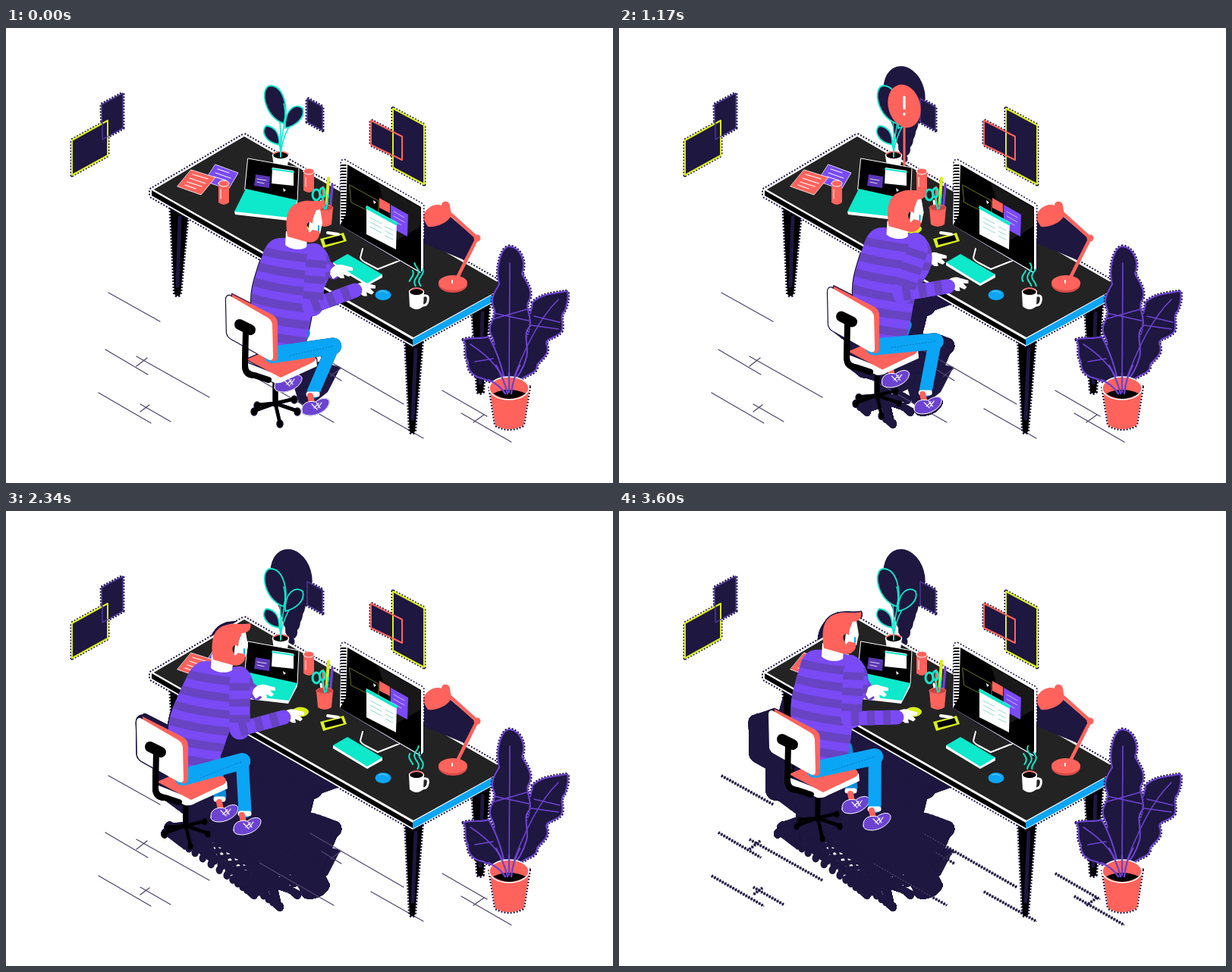
These frames come from a looping animation (800 by 600 pixels, 3630 ms). An HTML page with a canvas:

```html
<!DOCTYPE html>
<html lang="en">
<head>
<meta charset="utf-8">
<title>Desk work</title>
<style>
html, body { margin: 0; width: 100%; height: 100%; overflow: hidden; background: #fff; }
canvas { display: block; }
</style>
</head>
<body>
<canvas id="stage" width="800" height="600"></canvas>
<script>
const LOOP = 3630, STEP = 30;
const NAVY = '#1e1740', RED = '#ff635c', PURPLE = '#6c43d0', VIOLET = '#7a4af5', STRIPE = '#6843c2',
  TEAL = '#0ee8cb', BLUE = '#0ba5f5', LIME = '#d9f01c', WHITE = '#fff', BLACK = '#000', TOP = '#232323';

const screen = document.getElementById('stage').getContext('2d');
const trailCanvas = Object.assign(document.createElement('canvas'), { width: 800, height: 600 });
const trail = trailCanvas.getContext('2d');
let g = screen, tint = null, trailTime = 0;

// ---- drawing helpers ----
function shape(d, fill, stroke, w = 1.5, dash = []) {
  const p = new Path2D(d);
  g.lineJoin = 'round';
  g.lineCap = dash.length ? 'butt' : 'round';
  g.setLineDash(dash);
  if (fill) {
    g.fillStyle = tint || fill;
    g.fill(p);
    if (tint && !stroke) { stroke = tint; w = 2.5; }
  }
  if (stroke) {
    g.strokeStyle = tint || stroke;
    g.lineWidth = w;
    g.stroke(p);
  }
}
const line = (d, color, w, dash) => shape(d, null, color, w, dash);
const fringe = (d, w = 2) => line(d, NAVY, w, [2, 2]);
const limb = (pts, w, color, dash) => line('M' + pts.join('L'), color, w, dash);
const oval = (x, y, rx, ry, fill, stroke, w) =>
  shape(`M${x - rx} ${y}a${rx} ${ry} 0 1 0 ${2 * rx} 0a${rx} ${ry} 0 1 0 ${-2 * rx} 0Z`, fill, stroke, w);
function framed(d, stroke, w) {
  fringe(d, 5);
  shape(d, NAVY, stroke, w);
}
function at(x, y, draw, scale = 1) {
  g.save();
  g.translate(x, y);
  g.scale(scale, scale);
  draw();
  g.restore();
}

// ---- motion ----
// Monotone spline through rows of [time, ...values].
function track(rows, t) {
  const n = rows.length - 1;
  if (t <= rows[0][0]) return rows[0].slice(1);
  if (t >= rows[n][0]) return rows[n].slice(1);
  const i = rows.findIndex(r => r[0] > t) - 1, a = rows[i], b = rows[i + 1];
  const span = b[0] - a[0], u = (t - a[0]) / span;
  const slope = (k, c) => k < 0 || k >= n ? 0 : (rows[k + 1][c] - rows[k][c]) / (rows[k + 1][0] - rows[k][0]);
  const tangent = (k, c) => {
    const p = slope(k - 1, c), q = slope(k, c);
    return p * q > 0 ? 2 * p * q / (p + q) : 0;
  };
  return a.slice(1).map((v, j) => {
    const c = j + 1, u2 = u * u, u3 = u2 * u;
    return v + (b[c] - v) * (3 * u2 - 2 * u3) +
      span * (tangent(i, c) * (u3 - 2 * u2 + u) + tangent(i + 1, c) * (u3 - u2));
  });
}
// time, chair shift, head shift, far hand, near hand, near foot, far foot
const POSES = [
  [0, 0, 0, 0, 0, 440, 321, 470, 343, 408, 499, 372, 468],
  [500, 0, 0, 4, -8, 440, 321, 470, 343, 408, 499, 372, 468],
  [840, 0, 0, 8, -6, 427, 313, 461, 349, 408, 499, 372, 468],
  [1080, -3, -2, 3, -7, 425, 310, 455, 345, 408, 499, 371, 467],
  [1230, -28, -20, -34, -22, 405, 300, 433, 331, 406, 494, 357, 456],
  [1440, -91, -65, -103, -71, 375, 280, 398, 309, 385, 462, 318, 415],
  [1800, -115, -83, -98, -81, 338, 239, 376, 269, 318, 415, 288, 398],
  [2340, -118, -80, -98, -79, 338, 239, 376, 269, 318, 415, 288, 398],
  [2820, -118, -81, -107, -84, 338, 239, 376, 269, 338, 410, 310, 388],
  [3600, -93, -90, -101, -94, 338, 239, 376, 269, 340, 409, 312, 387]
];
const POP = [[680, 0], [840, .66], [960, 1.2], [1110, 1]];

function bend([ax, ay], [bx, by], l1, l2, side) {
  const d = Math.min(Math.hypot(bx - ax, by - ay), l1 + l2 - 1);
  const k = (l1 * l1 - l2 * l2 + d * d) / (2 * d), h = side * Math.sqrt(Math.max(0, l1 * l1 - k * k));
  const a = Math.atan2(by - ay, bx - ax), ux = Math.cos(a), uy = Math.sin(a);
  return [ax + ux * k - uy * h, ay + uy * k + ux * h];
}
function smooth(pts) {
  const mid = (p, q) => [(p[0] + q[0]) / 2, (p[1] + q[1]) / 2];
  return 'M' + mid(pts[pts.length - 1], pts[0]) +
    pts.map((p, i) => `Q${p} ${mid(p, pts[(i + 1) % pts.length])}`).join('') + 'Z';
}

// ---- worker ----
const shoe = (x, y) => at(x, y, () => {
  limb([[-7, -14], [-5, -5]], 8, RED);
  shape('M-18 6C-19-5-9-8 0-6C9-13 18-11 18-6C18 2 7 11-6 12C-14 12-18 10-18 6Z', PURPLE, WHITE, 1);
  line('M-5-3L2 4M1-5L6 2M-2 2L4-4M3 2L8-5', WHITE, 1.2);
});
const hand = (x, y) => at(x, y, () =>
  shape('M-14 2C-11-8-1-11 6-8L17-5L17-1L10-1L15 4L12 7L5 4L6 9L1 9L-3 6L-9 10Z', WHITE));

function chairBase() {
  limb([[355, 462], [355, 496]], 7, BLACK);
  for (const p of [[327, 505], [361, 521], [384, 505], [380, 489], [331, 497]]) {
    limb([[355, 495], p], 4.5, BLACK);
    oval(p[0], p[1] + 1, 3.5, 4.5, BLACK);
  }
}
function chairSeat() {
  shape('M314 440L316 449L354 468Q362 469 368 465L410 446L409 436L362 459Z', WHITE);
  shape('M317 437L352 422L404 430Q412 436 404 441L362 461Z', RED);
}
function chairBack() {
  shape('M298 351L351 378Q358 382 358 390L358 434Q357 441 350 439L300 400Z', RED);
  shape('M295 353Q290 352 290 359L291 402Q292 407 297 410L345 437Q352 440 352 433L351 391Q350 385 345 382Z', WHITE);
  limb([[308, 391], [322, 398]], 14, BLACK);
  line('M316 398L315 445Q315 458 328 458L346 464', BLACK, 8);
}

function worker(t) {
  const [cx, cy, hx, hy, fx, fy, nx, ny, sx, sy, ox, oy] = track(POSES, t);
  const typing = t < 560 || t > 1860 ? 1.5 : 0;
  const tap = Math.sin(t / 32) * typing, tap2 = Math.cos(t / 41) * typing;
  const warp = (x, y) => {
    const f = Math.max(0, Math.min(1, (y - 285) / 140));
    return [x + hx + (cx - hx) * f, y + hy + (cy - hy) * f];
  };

  at(cx, cy, chairBase);
  limb([[cx + 372, cy + 424], [cx + 392, cy + 402], [ox - 6, oy - 22]], 17, '#0b8ed6');
  limb([[ox - 11, oy - 18], [ox - 2, oy - 18]], 7, WHITE);
  shoe(ox, oy);
  at(cx, cy, chairSeat);

  const farShoulder = warp(410, 303);
  limb([farShoulder, [fx - 8, fy + 2]], 17, PURPLE);
  hand(fx, fy + tap);

  const torso = smooth([[374, 276], [346, 278], [333, 312], [322, 350], [325, 385], [331, 430], [360, 438],
    [392, 425], [400, 395], [406, 360], [428, 330], [428, 302], [412, 282], [394, 286]].map(p => warp(...p)));
  shape(torso, VIOLET);
  g.save();
  g.clip(new Path2D(torso));
  for (let y = 294; y < 440; y += 22)
    line(`M${warp(318, y - 6)}Q${warp(365, y + 10)} ${warp(435, y + 12)}`, STRIPE, 11);
  g.restore();

  const hip = [cx + 351, cy + 431], ankle = [sx - 3, sy - 19];
  const knee = bend(hip, ankle, 81, 66, -1);
  limb([hip, knee], 22, BLUE);
  limb([knee, ankle], 17, BLUE);
  line(`M${cx + 374} ${cy + 432}L${knee}`, '#0878bf', 1, [2, 2]);
  limb([[sx - 9, sy - 16], [sx + 2, sy - 16]], 7, WHITE);
  shoe(sx, sy);

  const shoulder = warp(409, 306), wrist = [nx - 10, ny + 3];
  const elbow = bend(shoulder, wrist, 61, 60, 1);
  hand(nx, ny + tap2);
  limb([shoulder, elbow], 27, VIOLET);
  limb([elbow, wrist], 19, VIOLET);
  limb([shoulder, elbow], 27, STRIPE, [10, 11]);
  limb([elbow, wrist], 19, STRIPE, [10, 11]);

  at(hx, hy, () => {
    shape('M369 268L397 278L396 289C388 294 374 292 368 286Z', WHITE);
    shape('M402 238L414 239L417 257L414 271L398 272Z', WHITE);
    shape('M371 275C367 250 371 235 386 230C397 225 408 230 420 227C422 235 417 240 409 240' +
      'L405 250L404 258C399 253 395 258 397 264L400 270L404 266L413 268C415 279 405 285 396 282Z', RED);
    line('M412 261L412 267', BLUE, 2);
  });
  at(cx, cy, chairBack);
}

function alertSign(t) {
  const [k] = track(POP, t), alpha = Math.max(0, Math.min(1, (2080 - t) / 220));
  if (k <= 0 || alpha <= 0) return;
  g.globalAlpha = alpha;
  at(376, 188, () => {
    line('M0-60L0 0', RED, 3);
    g.save();
    g.translate(0, -85);
    g.rotate(-.28);
    oval(0, 0, 21, 29, RED);
    g.restore();
    line('M0-97L0-82M0-75L0-74', WHITE, 3.2);
  }, k);
  g.globalAlpha = 1;
}

// ---- room ----
function wall() {
  framed('M126 101L154 86L154 132L127 147Z', '#4c3791');
  framed('M87 148L134 122L134 168L87 194Z', LIME, 2);
  line('M134 143L127 147L127 125', '#4c3791');
  framed('M397 93L417 104L417 135L397 124Z', '#4c3791');
  framed('M481 122L522 143L522 174L481 154Z', RED, 2);
  framed('M510 106L551 128L551 206L510 184Z', LIME, 2);
  line('M510 137L522 143L522 174L510 168', RED, 2);
}
function floor(t) {
  const planks = 'M135 349L203 387M131 424L187 457M172 433L268 487M186 435L172 446M122 481L191 521M177 496L217 519' +
    'M189 497L177 506M401 425L524 496M416 449L442 465M441 449L428 459M334 464L432 520M481 502L550 541' +
    'M575 478L634 512M600 508L666 546M630 510L616 520';
  line(planks, '#51476f', 1.3);
  if (t > 2700) fringe(planks, 4);
}
function desk() {
  for (const d of ['M216 230L240 246L230 351Q226 356 222 351Z', 'M614 370L638 358L629 480Q625 484 621 480Z',
    'M526 413L549 413L539 532Q535 537 532 532Z']) {
    fringe(d, 4);
    shape(d, BLACK);
  }
  line('M229 250L226 340M540 424L536 515M628 376L625 468', NAVY, 5);
  const edge = 'M190 213L314 140L662 340L662 351L536 420L190 222Z';
  fringe(edge, 4);
  shape(edge, WHITE);
  shape('M192 214L536 411L536 418L192 221Z', BLACK);
  shape('M193 213L314 142L660 341L537 409Z', TOP, WHITE, 1.8);
  shape('M536 410L660 341L660 351L536 419Z', BLUE);
}
function smallPlant() {
  line('M362 168C361 145 366 118 350 88M362 168C363 145 375 125 385 112M362 168C362 150 355 140 347 134', TEAL);
  shape('M366 126C340 117 334 79 348 76C366 76 373 106 366 126Z', NAVY, TEAL, 1.8);
  shape('M368 132C367 107 382 98 391 106C395 118 382 129 368 132Z', NAVY, TEAL, 1.8);
  shape('M360 154C340 150 336 135 343 129C355 130 361 140 360 154Z', NAVY, TEAL, 1.8);
  line('M362 168C361 140 372 120 366 100', TEAL);
  shape('M351 168L353 182L371 182L373 168Z', WHITE);
  oval(362, 168, 10.5, 5, BLACK, WHITE, 1.5);
  line('M352 166Q362 160 372 166', RED, 1.5);
  line('M362 170L362 160', TEAL, 2);
}
function can(x, y) {
  shape(`M${x - 7} ${y}L${x - 7} ${y + 25}Q${x} ${y + 31} ${x + 7} ${y + 25}L${x + 7} ${y}Z`, RED);
  oval(x, y, 7, 4, RED, WHITE, 1);
  line(`M${x - 4} ${y + 8}l0 12`, WHITE, 1);
}
function leftItems() {
  shape('M276 180L306 191L293 213L262 202Z', VIOLET, WHITE, .8);
  line('M279 186L294 191M276 191L296 198M274 196L290 201', WHITE, 1);
  shape('M244 187L276 197L257 220L226 209Z', RED, WHITE, .8);
  line('M246 193L266 199M242 198L263 205M239 203L258 209M236 207L250 212', WHITE, 1.2);
  can(287, 205);
  shape('M319 172L386 184L384 228L315 213Z', BLACK, WHITE, 1);
  shape('M329 193L348 196L347 211L327 208Z', '#5b36b5');
  line('M331 199L343 201M331 203L340 205', WHITE, .8);
  shape('M351 184L379 188L379 208L350 205Z', WHITE);
  line('M351 186L379 190', TEAL, 2);
  shape('M365 211L369 214L366 216Z', WHITE);
  shape('M301 242L302 246L372 254L384 231L384 227Z', WHITE);
  shape('M316 212L384 227L373 250L301 242Z', TEAL);
  can(399, 189);
}
function pencils() {
  line('M425 198L422 240', LIME, 4);
  line('M418 210L418 240', RED, 3);
  line('M430 207L427 240', PURPLE, 3.5);
  line('M415 228L417 240', WHITE, 3);
  oval(409, 220, 5, 7, null, TEAL, 3);
  oval(417, 217, 3.5, 6, null, TEAL, 3);
  shape('M409 237L411 259Q420 265 429 259L431 237Z', RED);
  oval(420, 237, 11, 4, '#c94441', RED, 1);
  line('M417 224L420 239M425 220L422 238', TEAL, 2);
  oval(388, 265, 11, 6.5, LIME);
  shape('M414 278L445 270L449 281L418 290Z', LIME);
  shape('M419 279L442 273L445 280L421 286Z', BLACK);
}
function monitor() {
  const frame = 'M442 175L446 174L550 233L550 318L546 323L440 260Z';
  line('M470 291L467 303Q468 306 473 309L490 318L518 307', WHITE, 2);
  fringe(frame, 3);
  shape(frame, WHITE);
  shape('M450 180L547 236L547 322L440 260L448 246Z', BLACK);
  line('M445 180L445 256', BLACK, 7, [2, 2]);
  shape('M490 204L546 237L546 262L515 280Z', '#181818');
  line('M453 207L491 228L491 248L455 230Z', '#6b7420', 1);
  shape('M492 224L506 232L506 244L492 237Z', RED);
  shape('M507 233L530 246L529 275L507 263Z', VIOLET);
  line('M511 242L525 250M511 248L525 256M511 254L521 260', '#c9b5ff', 1);
  shape('M475 234L515 256L514 292L475 272Z', WHITE);
  line('M476 237L514 258', TEAL, 4);
  line('M480 250L495 258M480 256L495 264M480 262L495 270M500 262L510 267M500 268L510 273M500 274L510 279', '#8fd8cf', 1);
  shape('M484 227L488 230L485 232Z', WHITE);
  line('M424 270L438 272', WHITE, 4);
}
function rightItems(t) {
  shape('M431 309L431 313L476 340L496 329L496 325Z', WHITE);
  shape('M431 309L450 298L496 325L476 337Z', TEAL);
  oval(497, 352, 10.5, 7, BLUE);
  line('M492 348Q498 345 503 350', '#7ad0ff', 1);
  line('M550 353Q558 351 556 360Q555 366 549 366', WHITE, 3);
  shape('M531 348L532 367Q541 375 550 367L551 348Z', WHITE);
  oval(541, 348, 9.5, 4.8, BLACK, WHITE, 1.5);
  line('M533 346Q541 340 549 346', RED, 1.5);
  [[534, 320, 335], [541, 310, 341], [547, 318, 340]].forEach(([x, y0, y1], i) => {
    const pts = [];
    for (let y = y0; y <= y1; y += 2) pts.push([x + 2.8 * Math.sin(y / 4.2 + t / 150 + i * .3), y]);
    limb(pts, 2, TEAL);
  });
}
function lamp() {
  shape('M551 250L580 244L620 278L604 306L551 284Z', NAVY);
  oval(589, 338, 19, 11, '#d84b48');
  oval(589, 336, 19, 10, RED);
  line('M594 331L621 277L580 240', RED, 4.5);
  oval(621, 277, 4.5, 4.5, RED);
  shape('M550 252C549 238 566 230 574 234C574 227 584 227 585 234L587 247C582 258 566 263 556 262Z', RED);
  line('M588 333L588 336', WHITE, 2);
}
function bigPlant() {
  framed('M664 478C670 450 678 440 685 420C682 410 692 400 691 388C688 376 694 372 694 362C706 350 722 350 740 347' +
    'C742 360 738 366 737 372C728 380 736 390 732 400C724 410 712 408 712 416C718 430 706 436 700 444' +
    'C700 456 688 456 684 460C676 464 670 468 664 478Z', PURPLE, 2);
  framed('M663 474C650 460 636 448 639 432C646 422 644 412 639 404C634 390 646 384 644 372C637 358 644 348 650 338' +
    'C645 318 652 288 664 288C678 290 686 308 680 324C686 336 694 344 690 358C682 368 694 380 690 394' +
    'C680 404 690 420 686 434C682 450 674 462 663 474Z', PURPLE, 2);
  framed('M660 478C655 450 646 424 636 407C626 411 614 407 603 411C609 420 602 430 609 440' +
    'C608 452 616 460 628 462C640 468 652 468 660 478Z', PURPLE, 2);
  line('M664 310L663 474M643 376L689 386M641 384L690 370M728 358C700 385 680 430 664 476M696 380L730 388' +
    'M692 392L728 397M612 417C640 435 655 455 661 476M618 440L642 436', PURPLE, 1.6);
  const pot = 'M637 473L645 524Q663 534 682 524L690 473Z';
  fringe(pot, 4);
  shape(pot, RED);
  oval(663, 475, 26, 15, RED, WHITE, 1.5);
  shape('M642 482Q663 472 685 482Q663 496 642 482Z', BLACK);
  line('M663 480L663 455M661 482Q656 462 646 445M666 482Q668 462 677 445M658 482Q650 470 636 464', PURPLE, 2.4);
}

// Everything that moves leaves a dark trace until the loop restarts.
function updateTrail(t) {
  if (t < trailTime - STEP) {
    trail.clearRect(0, 0, 800, 600);
    trailTime = 0;
  }
  g = trail;
  tint = NAVY;
  for (; trailTime <= t; trailTime += STEP) {
    worker(trailTime);
    if (trailTime < 1800) alertSign(trailTime);
  }
  g = screen;
  tint = null;
}

function render(t) {
  updateTrail(t);
  g.fillStyle = WHITE;
  g.fillRect(0, 0, 800, 600);
  shape('M374 455L412 440L441 447L424 480L396 502L386 494Z', NAVY);
  g.drawImage(trailCanvas, 0, 0);
  wall();
  floor(t);
  desk();
  smallPlant();
  alertSign(t);
  leftItems();
  pencils();
  lamp();
  monitor();
  rightItems(t);
  bigPlant();
  worker(t);
}

const start = performance.now();
function tick() {
  const t = (performance.now() - start) % LOOP;
  render(Math.floor(t / STEP) * STEP);
  requestAnimationFrame(tick);
}
tick();
</script>
</body>
</html>
```
